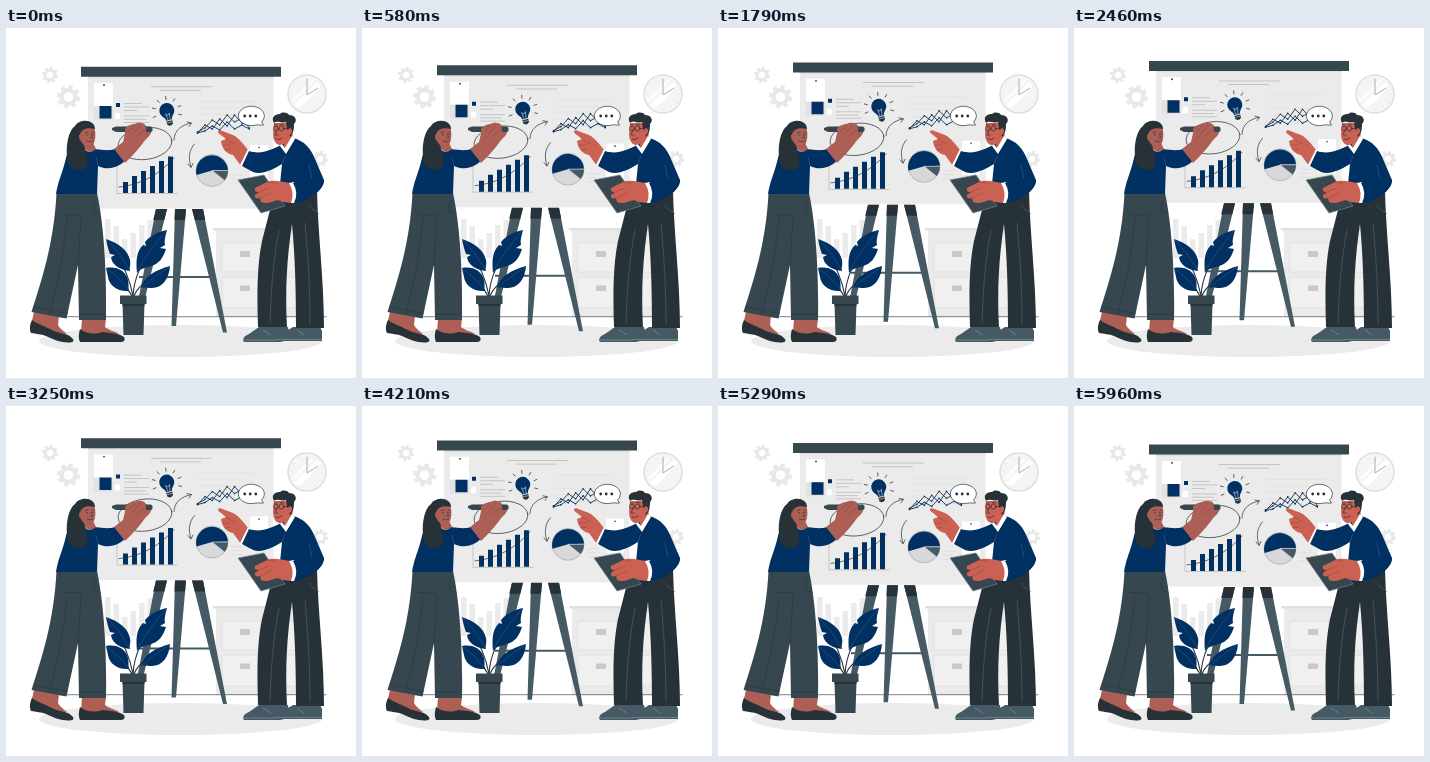
Animation, 350 px wide and 350 px high, one loop 6 s. Source, as an HTML page:

```html
<!DOCTYPE html>
<html lang="en">
<head>
<meta charset="utf-8">
<title>Presentation</title>
<style>
  html, body { margin: 0; width: 100%; height: 100%; overflow: hidden; background: #fff; }
  svg { display: block; width: 100vw; height: 100vh; }
  .navy { fill: #013062; }
  .dark { fill: #263238; }
  .slate { fill: #37474f; }
  .steel { fill: #455a64; }
  .pale { fill: #ebebeb; }
  .her { fill: #ad5f56; }
  .him { fill: #cb6152; }
  .line { fill: none; stroke: #263238; stroke-width: .7; stroke-linecap: round; stroke-linejoin: round; }
  .soft { fill: none; stroke: #c4c4c4; stroke-width: 1; }
  .seam { fill: none; stroke: #263238; stroke-width: .5; }
  .light { stroke: #5f727b; }
</style>
</head>
<body>
<svg viewBox="0 0 350 350">
  <ellipse class="pale" cx="174.500" cy="313" rx="141.500" ry="16"/>

  <g id="gears"></g>

  <!-- clock -->
  <circle cx="301" cy="66" r="19" fill="#f5f5f5" stroke="#dedede" stroke-width="1.500"/>
  <path d="M288 77L311 54L315 58L293 81ZM285 73L306 52L308 53L286 75Z" fill="#fff"/>
  <circle cx="301" cy="66" r="15.500" fill="none" stroke="#d8d8d8" stroke-width="1.500" stroke-dasharray=".6 7.515"/>
  <path d="M301 51V67L312 60" fill="none" stroke="#adadad"/>

  <!-- cabinet -->
  <path class="pale" d="M210 202H309V289H210Z"/>
  <path fill="#e0e0e0" d="M207 200H312V202.500H207Z"/>
  <path d="M216 215H303V244H216ZM216 249H303V280H216Z" fill="#f0f0f0" stroke="#dedede" stroke-width=".8"/>
  <path fill="#c9c9c9" d="M234 223H244V229H234ZM234 257.500H244V263H234Z"/>

  <path class="pale" d="M99 191H104.500V230H99ZM107.500 198H113V230H107.500ZM116 211H121.500V230H116ZM124.500 205H130V230H124.500ZM133 197H138.500V230H133ZM141.500 192H147V230H141.500Z"/>
  <path class="line" d="M31 288.700H320" style="stroke-width:.6"/>

  <g id="board">
    <path class="steel" d="M150 181H161L130.500 304.500H126ZM169 181H180L170 298H165.500ZM186 181H197L221 304.500H217ZM133 248H207V250H133Z"/>
    <path class="dark" d="M150 181H161L158.300 192H147.200ZM169 181H180L179 192H168.500ZM186 181H197L199.200 192H188.800Z"/>
    <path class="pale" d="M82 48H267.500V180.500H82Z"/>
    <path fill="#dedede" d="M82 48H267.500V50H82Z"/>
    <path class="slate" d="M75 38.700H275V48.700H75Z"/>

    <path class="soft" d="M145 58.700H206M154 62.300H195"/>
    <path class="soft" d="M118 75.500H136M118 79H143M118 82.500H131M118 88H143M118 91.300H140M118 94.500H143"/>
    <path fill="#fff" d="M88 55H107V78H88ZM109 85H114V91H109Z"/>
    <path fill="#e2e2e2" d="M88 78H107V92H88Z"/>
    <circle class="dark" cx="98" cy="57" r=".9"/>
    <path class="navy" d="M93.500 78H105.500V90.500H93.500ZM110 75H114V79H110Z"/>

    <!-- bulb -->
    <g transform="translate(161 83.500) rotate(-14)">
      <path class="navy" d="M-3 9C-3 5-7.500 4-7.500-1A7.500 7.500 0 0 1 7.500-1C7.500 4 3 5 3 9Z"/>
      <path class="dark" d="M-3 9.500H3V13L1 14.500H-1L-3 13Z"/>
      <path d="M-1 9L-2 2L0 4L2 2L1 9M-3 9.200H3M-3 11.300H3" fill="none" stroke="#ebebeb" stroke-width=".5"/>
      <path id="rays" class="line"/>
    </g>

    <ellipse class="line" cx="139" cy="115.500" rx="27" ry="16" transform="rotate(-7 139 115.500)"/>
    <path class="line" d="M168 112C168 102 176 97 185 95M181 94L185.500 95L183 98.500M188.500 116C183 122 182 130 185 139M182 136L185 139.500L187 135.500"/>

    <path class="line" d="M111 134V165.500H171" style="stroke:#b5b5b5"/>
    <path id="bars" class="navy"/>
    <path class="line" d="M113 159C132 157 151 149 168 130"/>

    <!-- line chart -->
    <path class="soft" d="M192 73.500H252M192 80H236M192 86.500H236M192 93H247M192 99.500H247" style="stroke:#dedede;stroke-width:.6"/>
    <g id="trends"></g>

    <!-- pie chart -->
    <circle cx="206" cy="142.500" r="16" fill="#d8d8d8" stroke="#8b969b" stroke-width=".5"/>
    <path class="navy" d="M206 142.500L190.500 147A16 16 0 1 1 222 142Z"/>
    <path class="steel" d="M206 142.500L222 142A16 16 0 0 1 218.500 152.500Z"/>
    <path d="M206 142.500L218.500 152.500M206 142.500H222" stroke="#ebebeb" stroke-width=".6"/>
    <path class="soft" d="M225 147H237M225 151H235M225 155H237" style="stroke:#dedede"/>
    <path fill="#fff" d="M244 117H262V151H244Z"/>
    <circle class="dark" cx="253" cy="119.500" r=".8"/>
  </g>

  <!-- plant -->
  <g>
    <path class="line" d="M127 268C124 252 119 239 109 225M127 268C128 249 137 230 150 218M128 268C132 258 141 252 152 248M126 268C121 259 114 252 107 247" style="stroke-width:1.100"/>
    <path class="navy" d="M131 245C130 233 130 224 137 217L140 218L139 214C145 207 152 204 161 202C160 207 158 211 159 217L154 220L160 221C157 230 153 236 145 238C139 240 135 240 131 245Z"/>
    <path class="navy" d="M135 260C138 248 150 242 164 238C163 251 156 260 146 260C141 260 138 259 135 260Z"/>
    <path class="navy" d="M100 211C112 215 122 222 124 232C125 237 123 240 124 243C115 242 106 238 105 229L109 227L104 226C102 221 101 216 100 211Z"/>
    <path class="navy" d="M100 240C111 238 120 243 122 252C123 256 122 259 123 263C111 264 103 257 102 249Z"/>
    <path d="M131 244Q141 225 160 203M136 259Q148 249 163 239M101 212Q115 226 123 241M101 241Q114 250 122 261" fill="none" stroke="#3b5f87" stroke-width=".5"/>
    <path class="slate" d="M116.500 275H138.500L137.500 307H117.500ZM114 267.500H140.500V276H114Z"/>
    <path class="dark" d="M116.500 276H138.500V278H116.500Z"/>
  </g>

  <!-- woman -->
  <g>
    <path class="her" d="M28 284L53 288L52 297C54 301 58 303 61 306C50 306 37 301 25 297ZM76 291H100L99 299C104 303 109 303 113 306C100 308 86 307 75 304Z"/>
    <path class="dark" d="M26 292C33 297 41 299 46 302C52 306 60 304 66 310C69 313 67 314 64 314.500C56 315 48 312 40 308C35 306 30 306 25 305C23 301 24 296 26 292ZM74 301C82 307 91 306 97 304C104 305 113 305 118 309C120 313 117 314 114 314H74C72 309 73 305 74 301Z"/>
    <path class="slate" d="M50.500 165H91C97 192 101 238 100 292H73L72 237L60.500 290.500L25.500 284C36 251 48 215 50.500 165Z"/>
    <path class="seam" d="M72 237L75 190M54 186C60 188 66 186 75 187M89 172C84 186 90 185 94 186M43 286C53 253 58 222 61 190M27 279L62 285.500M73 286H100"/>
    <path class="navy" d="M66 119L77 120Q83 127 89 121C97 122 103 123 109 121L119 133C110 141 101 142 92 138L91 166H50C52 153 56 146 59 134C61 126 62 121 66 119Z"/>
    <path class="seam" d="M92 138L90 129" style="stroke:#4a6a98"/>
    <path class="her" d="M108 121L117 114L120 101C122 96 129 96 132 95C137 94 140 96 141 101L146 102C145 108 140 110 137 115C132 122 126 128 119 135Z"/>
    <path class="slate" d="M106 100L110 98.500H145L146.500 100V103L144 104H110L106 102Z"/>
    <path class="her" d="M119 101C122 96 126 98 129 96C134 93 138 96 140 100L140 107L130 112L120 110Z"/>
    <path class="line" d="M129 98L123 103M134 97L127 106M139 101L131 108" style="stroke:#803f38;stroke-width:.5"/>
    <path class="dark" d="M85 96C81 91 72 93 69 98C62 103 60 118 61 128C60 137 66 143 73 142C81 142 84 136 80 126L78 112Z"/>
    <path class="her" d="M78 113L87 115L90 121Q84 127 79 121Z"/>
    <path class="her" d="M75 102C78 97 85 97 88 99C90 104 90 112 87 117C83 121 77 118 75 113C72 111 73 106 75 102Z"/>
    <path class="dark" d="M74 107C75 101 81 99 89 101C89 95 83 92 77 93C69 95 69 104 74 107Z"/>
    <path class="line" d="M79 104.500L82 104M86 104L88 104.500M85 106L87 110L84.500 110M81 113Q84 115 87 113" style="stroke-width:.6"/>
    <circle class="dark" cx="81" cy="106.700" r=".7"/>
    <circle class="dark" cx="87" cy="106.300" r=".6"/>
  </g>

  <!-- man -->
  <g>
    <path class="steel" d="M253 299H282L283 304L279 312C277 314 274 314 271 314H238C236 311 238 308 243 306ZM287 299H314L316 303V313H270C268 311 271 308 276 306Z"/>
    <path class="seam" d="M238 312H270M270 311.500H316M257 302L265 307M291 302L298 307" style="stroke:#93a4ac"/>
    <path class="dark" d="M266 174L311 163C312 207 318 252 318 300H290C290 262 289 228 286 196C281 229 279 262 281 299H252C251 266 251 237 256 213Z"/>
    <path class="seam light" d="M303 177C307 184 312 183 313 186M264 295C265 259 268 227 273 202M304 296C304 260 302 228 299 195"/>
    <path class="him" d="M243 123L235 138L227 127C221 126 216 121 215 113L220 111L212.500 105C211 103 213 102 215 102.500L227 107C233 110 238 117 243 123Z"/>
    <path class="line" d="M220 111L228 116M217 117L224 117M219 122L225 121" style="stroke:#8d443b;stroke-width:.5"/>
    <path fill="#fff" d="M242 121L245 123L237 140L234 137Z"/>
    <path class="navy" d="M275 117L287 110C299 113 305 121 309 131L318 152C319 160 306 171 290 175L272 176L276 136C266 142 256 147 247 144L236 138L243 123C255 127 265 122 275 117Z"/>
    <path class="seam" d="M276 136L279 128M303 137L306 151L289 157" style="stroke:#4a6a98"/>
    <path class="slate" d="M232 152L258 147L279 178L255 185Z" stroke="#71828a" stroke-width=".7"/>
    <path class="him" d="M291 157L285 155C277 154 267 151 261 154L249 160C248 163 250 164 253 164L249 167C248 170 251 171 254 170L255 174C261 177 267 173 272 172C278 175 284 176 291 173Z"/>
    <path fill="#fff" d="M283 155L288 154Q294 165 289 175L285 175Q289 165 283 155Z"/>
    <path class="navy" d="M287 155L306 150L318 152C316 165 302 172 288 175Q293 165 287 155Z"/>
    <path class="line" d="M253 164L263 160M254 170L265 165M261 154L269 155" style="stroke:#8d443b;stroke-width:.5"/>
    <path class="him" d="M276 109L286 101L287 111L279 122Z"/>
    <path fill="#fff" d="M275 115L279 120L286 108L289 111L280 126L274 118Z"/>
    <path class="him" d="M268 95H283L285 105C283 112 278 117 273 117C267 115 266 108 268 95Z"/>
    <path class="dark" d="M268 95C265 90 268 86 274 86C276 84 281 84 283 87C289 87 292 92 288 96C288 102 287 106 284 109L281 101L280 94C276 96 272 92 268 95Z"/>
    <path class="him" d="M281 102C284 98 288 101 285 106L282 108Z"/>
    <g class="line">
      <circle cx="270" cy="100.500" r="2.300"/><circle cx="275.500" cy="100.500" r="2.500"/>
      <path d="M278 100.500L283 101M268.500 97H271M274 96.500L278 97M271 102L269 107L272 107M270 111Q273 113 276 110"/>
    </g>
  </g>

  <!-- speech bubble -->
  <path d="M255.500 94A13 9.700 0 1 0 250 97C253 96.500 255 97.500 257.500 97Z" fill="#fff" stroke="#263238" stroke-width=".7"/>
  <g class="dark"><circle cx="238.700" cy="88" r="1.400"/><circle cx="244.200" cy="88" r="1.400"/><circle cx="249.800" cy="88" r="1.400"/></g>
</svg>
<script>
const $ = id => document.getElementById(id);
const polar = (r, a) => (r * Math.cos(a)).toFixed(2) + ' ' + (r * Math.sin(a)).toFixed(2);

function gear(x, y, r) {
  let teeth = '';
  for (let i = 0; i < 8; i++) {
    const a = i * Math.PI / 4;
    teeth += `M${polar(r * .6, a)}L${polar(r, a)}`;
  }
  return `<g transform="translate(${x} ${y}) rotate(12)" fill="none" stroke="#e8e8e8">
    <circle r="${r * .6}" stroke-width="${r * .36}"/><path d="${teeth}" stroke-width="${r * .38}"/></g>`;
}
$('gears').innerHTML = gear(62.5, 69, 11.5) + gear(44, 47, 8) + gear(314, 131, 8);

let rays = '';
for (let i = 0; i < 7; i++) {
  const a = Math.PI * (.95 + i * 1.2 / 6);
  rays += `M${polar(12, a)}L${polar(15, a)}`;
}
$('rays').setAttribute('d', rays);

$('bars').setAttribute('d', [154, 148, 143, 138, 133, 128.5]
  .map((y, i) => `M${117 + 9 * i} ${y}h5V165h-5Z`).join(''));

function trend(ys, color) {
  const pts = ys.map((y, i) => [191.5 + i * 7.4, y]);
  return `<polyline points="${pts.join(' ')}" fill="none" stroke="${color}" stroke-width=".9"/>` +
    pts.map(([x, y]) => `<circle cx="${x}" cy="${y}" r=".8" fill="${color}"/>`).join('');
}
$('trends').innerHTML = trend([105, 97, 101, 91, 98, 87, 95, 97], '#013062') +
  trend([104, 100, 92, 97, 87, 94, 90, 100], '#263238') +
  trend([105, 103, 98, 102, 94, 101, 97, 101], '#013062');

// The board rises 7 units and sinks back at constant speed.
function draw() {
  const t = performance.now() % 6000;
  const lift = 7 * (1 - Math.abs(t / 3000 - 1));
  $('board').setAttribute('transform', `translate(0 ${-lift})`);
  requestAnimationFrame(draw);
}
draw();
</script>
</body>
</html>
```
